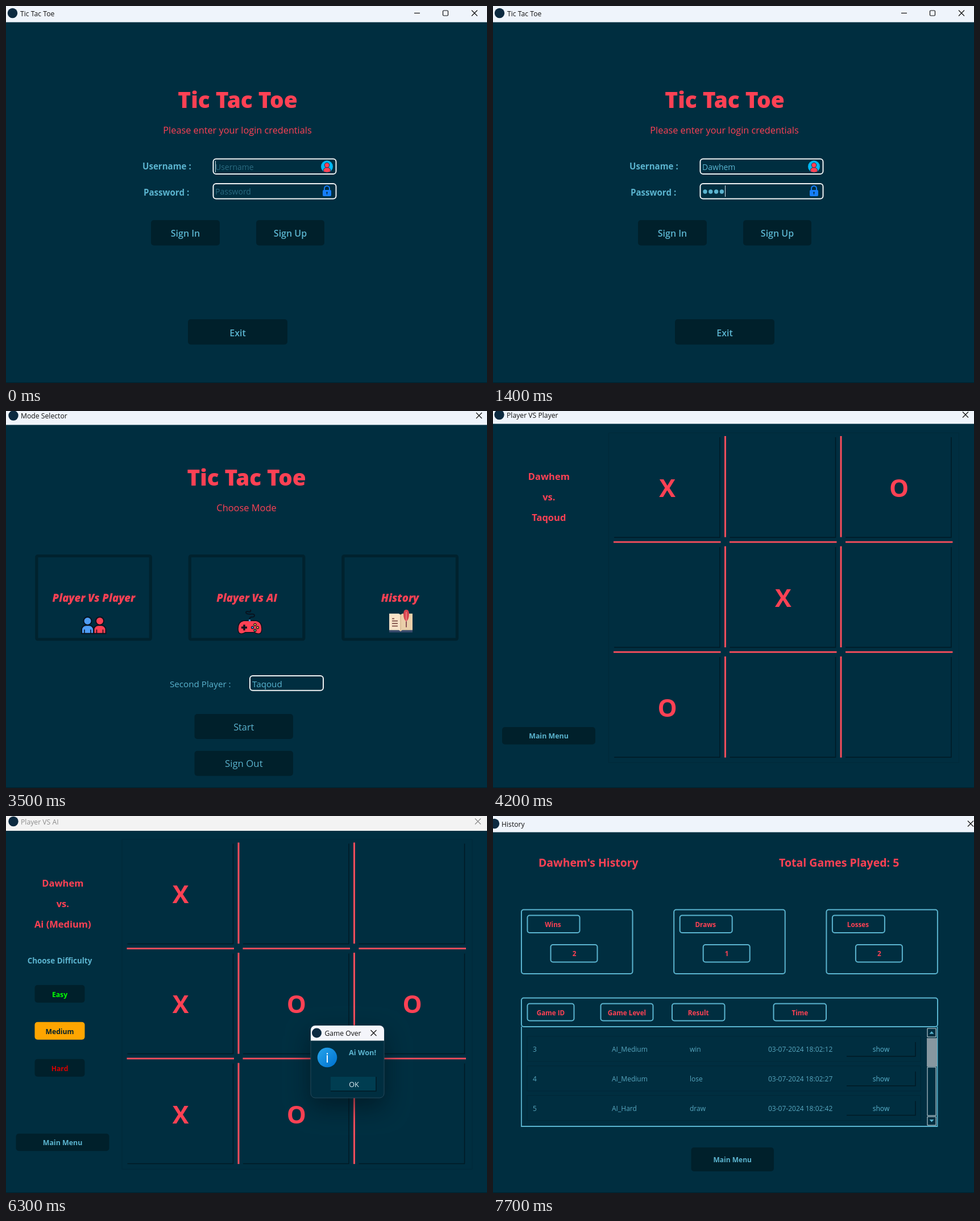
Recreate the animation shown at these times as an HTML page with a canvas. Size 846 px wide and 662 px high, loop 8000 ms.

```html
<!DOCTYPE html>
<html lang="en">
<head>
<meta charset="utf-8">
<title>Tic Tac Toe</title>
<style>
html, body { margin: 0; width: 100%; height: 100%; overflow: hidden; background: #002e40; }
canvas { display: block; width: 846px; height: 662px; }
</style>
</head>
<body>
<canvas id="stage" width="846" height="662"></canvas>
<script>
const c = document.getElementById('stage').getContext('2d');
const BG = '#002e40', DARK = '#00202b', EDGE = '#001a24', RED = '#ff4154', CYAN = '#5bb4cf', BLUE = '#157efb';
const PLAYER = 'Dawhem', RIVAL = 'Taqoud';

function text(s, x, y, size, color, weight = 400, align = 'left', style = 'normal') {
  c.font = `${style} ${weight} ${size}px "Open Sans", "Noto Sans", sans-serif`;
  c.textAlign = align;
  c.fillStyle = color;
  c.fillText(s, x, y);
}
const mid = (s, x, y, size, color, weight, style) => text(s, x, y, size, color, weight, 'center', style);

function box(x, y, w, h, r, fill, stroke, lw = 2) {
  c.beginPath();
  c.roundRect(x, y, w, h, r);
  if (fill) { c.fillStyle = fill; c.fill(); }
  if (stroke) { c.strokeStyle = stroke; c.lineWidth = lw; c.stroke(); }
}

function disc(x, y, r, fill, stroke, lw = 1.5) {
  c.beginPath();
  c.arc(x, y, r, 0, 7);
  c.fillStyle = fill;
  c.fill();
  if (stroke) { c.strokeStyle = stroke; c.lineWidth = lw; c.stroke(); }
}

function path(d, fill, stroke, lw = 1) {
  const p = new Path2D(d);
  if (fill) { c.fillStyle = fill; c.fill(p); }
  if (stroke) { c.strokeStyle = stroke; c.lineWidth = lw; c.stroke(p); }
}

function at(x, y, draw) {
  c.save();
  c.translate(x, y);
  draw();
  c.restore();
}

function button(x, y, w, h, label, size, baseline, weight = 400, color = CYAN, fill = DARK) {
  box(x, y, w, h, 5, fill);
  mid(label, x + w / 2, baseline, size, color, weight);
}

const cross = (x, y, color) => at(x, y, () => path('M-5-5L5 5M5-5L-5 5', null, color, 1.2));

function titleBar(h, title, iconX, textX, y, closeX, active = true) {
  const ink = active ? '#111' : '#8c8c8c';
  c.fillStyle = BG;
  c.fillRect(0, 0, 846, 662);
  c.fillStyle = DARK;
  c.fillRect(0, 661, 846, 1);
  c.fillStyle = active ? '#eff4fb' : '#f3f3f3';
  c.fillRect(0, 0, 846, h);
  disc(iconX, y, 8.7, '#0c2a40');
  text(title, textX, y + 5, 12.2, ink);
  cross(closeX, y, ink);
}

function userIcon(x, y) {
  at(x, y, () => {
    disc(0, 0, 10.5, '#00b9f5');
    path('M-6.5 8.5Q-6.5 1.5 0 1.5T6.5 8.5Q0 12 -6.5 8.5Z', RED, '#23304a', 1);
    disc(0, -2.5, 4.3, RED, '#23304a', 1);
  });
}

function lockIcon(x, y) {
  at(x, y, () => {
    path('M-4.5-1V-4.5A4.5 4.5 0 0 1 4.5-4.5V-1', null, BLUE, 2);
    box(-7.5, -2, 15, 11, 2, BLUE);
    disc(0, 2.5, 1.3, BG);
    path('M0 2.5V6', null, BG, 1.2);
  });
}

const field = (x, y, w, h) => box(x, y, w, h, 5, null, '#f0f2f3', 2);
const caret = (x, y, h) => { c.fillStyle = '#d5e4ea'; c.fillRect(x, y, 1, h); };

function dots(x, y) {
  for (let i = 0; i < 4; i++) disc(x + i * 9.8, y, 3.7, CYAN);
}

function login(filled) {
  titleBar(28.5, 'Tic Tac Toe', 11.5, 25, 12.5, 824);
  path('M718 12.5H728', null, '#111', 1.2);
  box(768.5, 8, 9, 9, 1.5, null, '#111', 1.2);
  mid('Tic Tac Toe', 407.5, 179, 38.8, RED, 800);
  mid('Please enter your login credentials', 407, 224, 16.3, RED);
  text('Username :', 240, 287, 15.1, CYAN, 700);
  text('Password :', 242, 333, 15.1, CYAN, 700);
  field(364.5, 268.5, 216, 26.5);
  field(364.5, 312, 216, 26.5);
  if (filled) {
    text(PLAYER, 368, 288, 14, CYAN);
    dots(373, 326);
    caret(408, 315, 20);
  } else {
    text('Username', 368, 288, 14, '#2b6b80');
    text('Password', 368, 331, 14, '#2b6b80');
    caret(368, 272, 20);
  }
  userIcon(564.5, 282);
  lockIcon(564.5, 325);
  button(255, 376, 121, 44.5, 'Sign In', 16, 405, 600);
  button(440, 376, 120, 44.5, 'Sign Up', 16, 405, 600);
  button(320, 550, 175, 44.5, 'Exit', 16, 579.5, 600);
}

function signUp() {
  titleBar(22, 'Sign Up', 12, 26, 5.5, 833);
  mid('Welcome to Tic Tac Toe', 425, 149.5, 36.8, RED, 700);
  mid('Please Enter Your Info', 425, 196, 16.2, RED);
  text('Username :', 234, 301.5, 15.2, CYAN, 700);
  text('Password :', 234, 367, 15.2, CYAN, 700);
  text('Confirm Password :', 191, 432, 15.2, CYAN, 700);
  for (const y of [281.5, 346, 411]) field(387, y, 205.5, 29.5);
  text(PLAYER, 391, 303, 14.2, CYAN);
  userIcon(575.5, 297);
  for (const y of [362, 427]) {
    dots(395.5, y);
    lockIcon(576, y - 0.5);
  }
  caret(429.5, 416, 21);
  button(364.5, 511, 120.5, 44, 'Register', 13.5, 539);
}

function person(x, color) {
  const ink = '#08131f';
  box(x - 10.5, 374.5, 21, 14.5, [8, 8, 0, 0], color, ink, 2);
  path(`M${x - 5.5} 382V389M${x + 5.5} 382V389`, null, ink, 1.5);
  disc(x, 367, 7, color, ink, 2);
}

function gamepad() {
  const ink = '#08131f';
  path('M428.5 367V363Q428.5 360 433 360T437 357T430 355Q422 355 422 352T429 351Q431 350 430 347', null, ink, 2);
  path('M418 366.5H440Q450 368 450 381Q450 389.5 444 389.5Q440 389.5 437 387H421Q418 389.5 414 389.5Q408 389.5 408 381Q408 368 418 366.5Z', RED, ink, 1.6);
  disc(428.5, 366, 1.8, '#4f9df5');
  path('M414 378.5H424M419 373.5V383.5', null, ink, 3.4);
  [[438, 373.5, '#ffc53d'], [433.5, 378.5, '#4f9df5'], [442.5, 378.5, '#ffc53d'], [438, 383.5, '#46c37b']]
    .forEach(([x, y, color]) => disc(x, y, 2, color, ink, 1.2));
}

function book() {
  path('M674 383H715V387H674Z', '#394a6c');
  path('M674 354H691L694 356V385L691 383H674Z', '#f7e3c8');
  path('M694 356L697 354H715V383H697L694 385Z', '#eacfa9');
  path('M694 356V385', null, '#c9a57a', 1);
  path('M679 363H683M679 367H689M679 371.5H689M679 376H689', null, '#7d4d45', 1.8);
  path('M704 358V378', null, '#6a2a3c', 1.5);
  path('M704 347Q709 347 709 355Q709 364 704 368Q699 364 699 355Q699 347 704 347Z', '#d8434f');
  path('M704 351V368', null, '#f3a9a4', 1);
}

function modes(second, name) {
  const dy = second ? 1.7 : 0, dx = second ? -1 : 0;
  titleBar(23.4 - dx, 'Mode Selector', 14 + dx, 27 + dx, 7 - dx, 831 - dx);
  at(0, dy, () => {
    mid('Tic Tac Toe', 423, 129, 38.6, RED, 800);
    mid('Choose Mode', 423, 174, 16.4, RED);
    ['Player Vs Player', 'Player Vs AI', 'History'].forEach((label, i) => {
      box(53.8 + i * 269.5, 252.8, 200.5, 146.5, 2, null, '#00222e', 5.2);
      mid(label, 154.3 + i * 269.3, 333, 18.5, RED, 800, 'italic');
    });
    person(143.5, '#4f9df5');
    person(165, RED);
    gamepad();
    book();
    button(331.5, 595, 173.5, 44, 'Sign Out', 16.8, 623.5);
  });
  if (!second) return;
  text('Second Player :', 288, 485, 15.2, CYAN);
  field(429, 465, 129, 25.8);
  text(name, 433, 485, 15.2, CYAN);
  if (!name) caret(433, 469, 19);
  button(331.5, 532, 173.5, 44, 'Start', 16.3, 561);
}

function board(marks) {
  c.strokeStyle = '#002939';
  c.lineWidth = 1;
  c.strokeRect(203.5, 38.5, 616, 579);
  for (let i = 0; i < 3; i++) {
    const x = 212 + 204 * i, y = 44 + 193.5 * i;
    c.fillStyle = '#fa4d5c';
    for (let j = 0; j < 2; j++) {
      c.fillRect(x, 228.7 + 193.2 * j, 188.5, 2.8);
      c.fillRect(407 + 203.5 * j, y, 3, 177.5);
    }
  }
  if (!marks) return;
  [...marks].forEach((mark, n) => {
    const i = n % 3, j = Math.floor(n / 3);
    const x = 399 + 203.5 * i, y = 222 + 193 * j;
    path(`M${x} ${y - 176}V${y}H${x - 186}`, null, EDGE, 1.5);
    if (mark !== '.') mid(mark, 306.5 + 203.8 * i, 150.5 + 193.3 * j, 43, RED, 700);
  });
}

function dialog(message, extra = 0) {
  const w = 129 + extra;
  c.save();
  c.shadowColor = 'rgba(0,12,20,.55)';
  c.shadowBlur = 42;
  c.shadowOffsetY = 16;
  box(536, 368, w, 127, 8, BG);
  c.restore();
  box(536, 368, w, 127, 8, BG, '#24485a', 1);
  box(536, 368, w, 26.5, [8, 8, 0, 0], '#f4f5fa');
  disc(546.5, 381, 8.5, '#0c2a40');
  text('Game Over', 560.5, 386, 12.1, '#111');
  cross(646.5 + extra, 381, '#111');
  const blue = c.createLinearGradient(550, 410, 580, 440);
  blue.addColorStop(0, '#25a2ea');
  blue.addColorStop(1, '#0072cf');
  disc(565, 424, 17.3, blue);
  mid('i', 565, 433, 24, '#fff');
  text(message, 603, 420, 12.8, CYAN, 700);
  c.fillStyle = '#003d51';
  c.fillRect(571 + extra, 458, 80, 25);
  path(`M${651 + extra} 458V483H${571 + extra}`, null, EDGE, 1.5);
  mid('OK', 612 + extra, 476, 12.6, '#dcebf0');
}

function game({ title = 'Player VS AI', rival, levels = true, level, marks, message, extra }) {
  const over = !!message;
  if (over) titleBar(26, title, 13, 26, 9.5, 830, false);
  else titleBar(22.5, title, 11, 24, 6.5, 831);
  at(over ? 1.5 : 0, over ? 2.7 : 0, () => {
    [PLAYER, 'vs.', rival].forEach((s, i) => mid(s, 98.3, 121 + 36 * i, 16.5, RED, 700));
    if (levels) {
      mid('Choose Difficulty', 93, 256, 13.4, CYAN, 700);
      [['Easy', '#00ff00'], ['Medium', '#ffa500'], ['Hard', '#d60000']].forEach(([s, color], i) => {
        const on = s === level, y = 294 + 65 * i;
        button(49, y, 88, 31, s, 12.2, y + 21, 700, on ? DARK : color, on ? color : DARK);
      });
    }
    button(16, 555, 164, 30.5, 'Main Menu', 12.4, 575, 700);
  });
  at(over ? 0.5 : 0, over ? 2.6 : 0, () => board(marks));
  if (over) dialog(message, extra);
}

function frame(x, y, w, h, label, labelX) {
  box(x, y, w, h, 4, null, CYAN, 2);
  if (label) mid(label, labelX, y + 20, 11.7, RED, 700);
}

function history() {
  titleBar(28.5, 'History', 2.5, 15, 13.5, 840);
  text(`${PLAYER}'s History`, 80, 89, 19.4, RED, 700);
  text('Total Games Played: 5', 503, 89, 19.5, RED, 700);
  [['Wins', 2], ['Draws', 1], ['Losses', 2]].forEach(([name, n], i) => at(268.2 * i, 0, () => {
    frame(50, 164.5, 195.5, 112.5);
    frame(60.5, 174.5, 92, 30.5, name, 105.5);
    frame(101.5, 226, 82, 30.5, n, 143);
  }));
  frame(50, 319.5, 732, 50.5);
  [[60.5, 82, 'Game ID'], [189.5, 92, 'Game Level'], [315, 92.5, 'Result'], [493.5, 92.5, 'Time']]
    .forEach(([x, w, s]) => frame(x, 329.5, w, 30, s, x + w / 2));
  path('M50 370V545H781.5V370', null, CYAN, 1.8);
  [[3, 'AI_Medium', 'win', 12], [4, 'AI_Medium', 'lose', 27], [5, 'AI_Hard', 'draw', 42]].forEach(([id, level, result, sec], i) => {
    const y = 414 + 51.8 * i, ink = '#56a6be';
    path(`M60 ${y - 27}H752V${y + 17}H60Z`, null, '#002838', 1.2);
    text(id, 70, y, 12, ink);
    text(level, 209, y, 12, ink);
    text(result, 346, y, 12, ink);
    text('03-07-2024 18:02:' + sec, 484, y, 12, ink);
    path(`M743 ${y - 17}V${y + 8}H622`, null, EDGE, 1.5);
    mid('show', 682.5, y, 12, CYAN);
  });
  c.fillStyle = '#8797a0';
  c.fillRect(763, 390, 18, 50);
  for (const [y, h] of [[373, 15], [441, 85], [528, 15]]) box(764, y, 15, h, 0, BG, '#d9e2e6', 1);
  path('M767.5 382.5L771.5 378L775.5 382.5ZM767.5 533L771.5 537.5L775.5 533Z', CYAN);
  button(348.5, 582, 145.5, 42, 'Main Menu', 12, 608, 700);
}

const screens = [
  () => login(false),
  signUp,
  () => login(true),
  () => modes(false),
  () => modes(true, ''),
  () => modes(true, RIVAL),
  () => game({ title: 'Player VS Player', rival: RIVAL, levels: false, marks: 'X.O.X.O..' }),
  () => game({ rival: 'Ai(Diff)' }),
  () => game({ rival: 'Ai (Medium)', level: 'Medium', marks: 'OX..OXX.O', message: PLAYER + ' Won!', extra: 44 }),
  () => game({ rival: 'Ai (Medium)', level: 'Medium', marks: 'X..XOOXO.', message: 'Ai Won!' }),
  () => game({ rival: 'Ai (Hard)', level: 'Hard', marks: 'XOXXOOOXX', message: 'Draw!' }),
  history
];

const start = performance.now();
function tick() {
  const t = (performance.now() - start) % 8000;
  screens[Math.floor(t / 700)]();
  requestAnimationFrame(tick);
}
tick();
</script>
</body>
</html>
```
